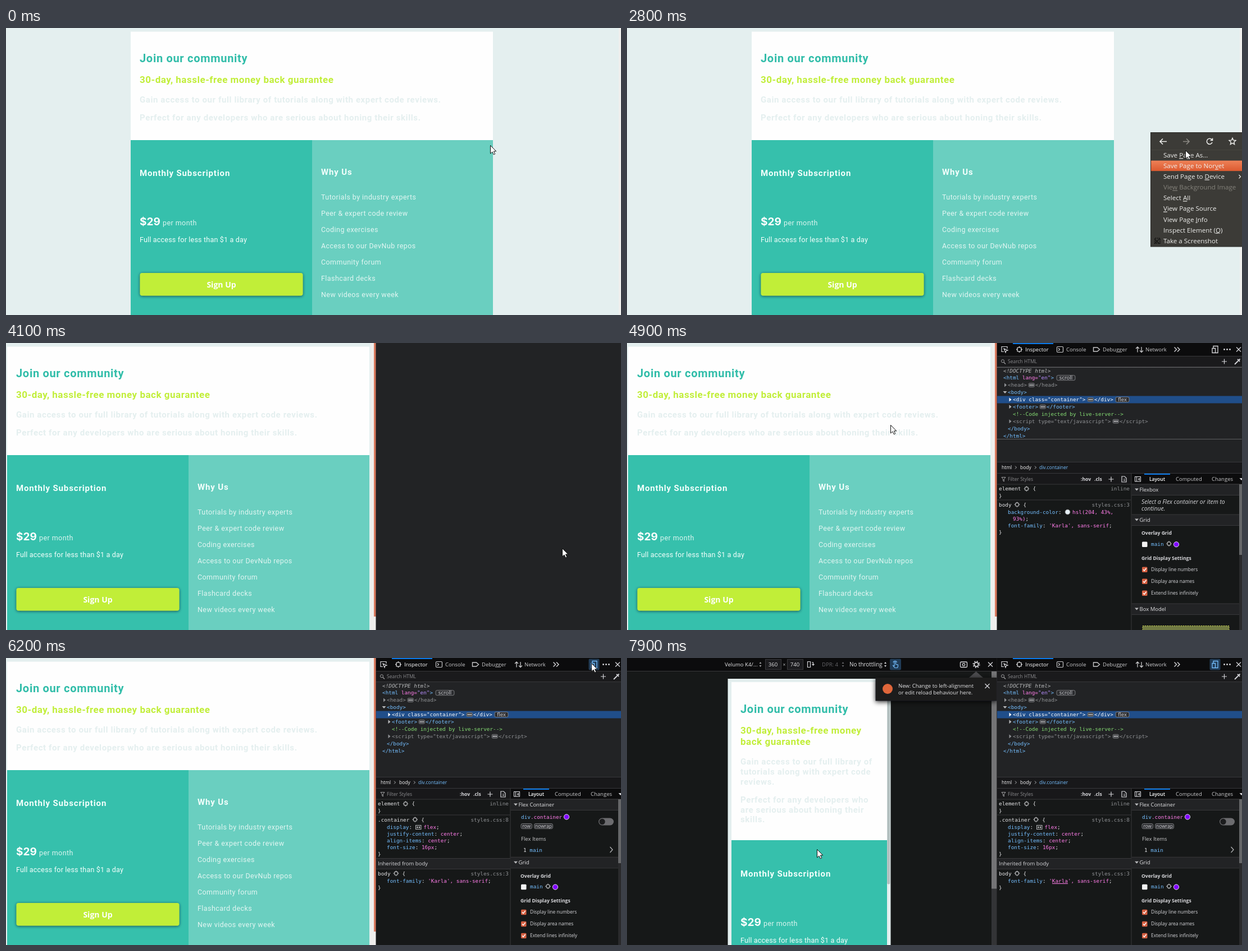
Write an HTML page that moves like this. It is 1095 px wide and 512 px high and loops after 8 s.

```html
<!DOCTYPE html>
<html lang="en">
<head>
<meta charset="utf-8">
<title>Responsive pricing page</title>
<style>
html, body { margin: 0; width: 100%; height: 100%; overflow: hidden; background: #e4efef; }
svg { display: block; width: 100%; height: 100%; }
text { white-space: pre; }
.h1, .h2, .h3, .h4, .li, .sm { font-family: Roboto, sans-serif; }
.h1 { font-size: 20px; font-weight: 700; letter-spacing: .7px; }
.h2 { font-size: 17px; font-weight: 700; letter-spacing: .51px; }
.h3 { font-size: 15px; font-weight: 700; letter-spacing: .6px; }
.h4 { font-size: 15px; font-weight: 700; letter-spacing: .85px; }
.li { font-size: 12.5px; letter-spacing: .43px; }
.sm { font-size: 12.5px; letter-spacing: .2px; }
.price { font-family: Inter, sans-serif; font-size: 19px; font-weight: 700; }
.u, .us, .ub, .ui, .btn, .menu { font-family: "Open Sans", sans-serif; }
.u { font-size: 9.5px; }
.us { font-size: 8.5px; }
.ub { font-size: 8.6px; font-weight: 700; }
.ui { font-size: 10.4px; font-style: italic; }
.btn { font-size: 14px; font-weight: 700; }
.menu { font-size: 11.6px; }
.m { font-family: "DejaVu Sans Mono", monospace; font-size: 9.35px; }
</style>
</head>
<body>
<svg id="stage" viewBox="0 0 1095 512" preserveAspectRatio="none"></svg>
<script>
const BG = '#e4efef', TEAL = '#36c0ac', LIME = '#c1ee39', BAR = '#0c0c0d', PANEL = '#222325', DARK = '#161818',
  LINE = '#38383b', GREY = '#b8b9bb', WHITE = '#f6f6f7', BLUE = '#75bfff', PURPLE = '#8000ff', ACTIVE = '#213c57';

const rect = (x, y, w, h, fill, more = '') => `<rect x="${x}" y="${y}" width="${w}" height="${h}" fill="${fill}" ${more}/>`;
const text = (cls, x, y, s, fill, more = '') => `<text class="${cls}" x="${x}" y="${y}" fill="${fill}" ${more}>${s}</text>`;
const path = (d, stroke = GREY, w = 1.2, fill = 'none') => `<path d="${d}" stroke="${stroke}" stroke-width="${w}" fill="${fill}"/>`;
const dot = (x, y, r, fill, more = '') => `<circle cx="${x}" cy="${y}" r="${r}" fill="${fill}" ${more}/>`;
const group = (id, s) => `<g id="${id}">${s}</g>`;
const hline = (x, y, w) => rect(x, y, w, 1, LINE);
const END = 'text-anchor="end"', MID = 'text-anchor="middle"';

// Each part of a code line starts with its colour letter.
const INK = { b: BLUE, p: '#ff7de9', v: '#b98eff', w: '#e4e4e6', d: '#8f9194', g: '#86de74', W: '#ffffff' };
const code = (x, y, ...parts) => text('m', x, y, parts.map(p =>
  `<tspan fill="${INK[p[0]]}">${p.slice(1).replace(/</g, '&lt;')}</tspan>`).join(''), WHITE);
const tag = (x, y, w, s, cls = 'u') => rect(x, y - 4.5, w, 9, '#2c2d30', 'rx="2.5" stroke="#8f9092" stroke-width=".8"') +
  text(cls, x + w / 2, y + 3, s, '#d7d7db', MID);
const dots = (x, y) => rect(x, y - 3.5, 10.5, 7, '#4a4b4f', 'rx="2" stroke="#8f9092" stroke-width=".6"') +
  [2.7, 5.3, 7.9].map(d => dot(x + d, y, .9, '#fff')).join('');
const right = (x, y, c = GREY) => path(`M${x} ${y - 3.5}v7l4-3.5z`, 'none', 0, c);
const down = (x, y, c = GREY) => path(`M${x} ${y - 2}h7l-3.5 4z`, 'none', 0, c);
const cross = (x, y, r = 4, c = '#d7d7db') => path(`M${x - r} ${y - r}l${2 * r} ${2 * r}m0 ${-2 * r}l${-2 * r} ${2 * r}`, c, 1.3);
const plus = (x, y) => path(`M${x - 4.5} ${y}h9m-4.5 -4.5v9`, '#d7d7db', 1.2);
const target = (x, y, r = 2.8, c = GREY) => rect(x - r, y - r, 2 * r, 2 * r, 'none', `rx="1" stroke="${c}" stroke-width="1.2"`) +
  path(`M${x} ${y - r - 2}v2m0 ${2 * r}v2M${x - r - 2} ${y}h2m${2 * r} 0h2`, c, 1.2);
const gear = (x, y) => dot(x, y, 3.6, 'none', 'stroke="#d7d7db" stroke-width="1.8"') +
  dot(x, y, 5.6, 'none', 'stroke="#d7d7db" stroke-width="1.8" stroke-dasharray="2 2.4"');
const updown = (x, y, c) => path(`M${x - 2} ${y - 1.5}l2 -3 2 3zM${x - 2} ${y + 1.5}l2 3 2 -3z`, 'none', 0, c);

function page() {
  const items = ['Tutorials by industry experts', 'Peer &amp; expert code review', 'Coding exercises',
    'Access to our DevNub repos', 'Community forum', 'Flashcard decks', 'New videos every week'];
  return rect(222, 6.5, 645, 194, '#fefefe') + rect(222, 200, 323, 312, TEAL) + rect(545, 200, 322, 312, '#6acfc0') +
    text('h1', 238, 61, 'Join our community', '#31bda9') +
    text('h2', 238, 98, '30-day, hassle-free money back guarantee', LIME) +
    text('h3', 238, 132.5, 'Gain access to our full library of tutorials along with expert code reviews.', BG) +
    text('h3', 238, 164.5, 'Perfect for any developers who are serious about honing their skills.', BG) +
    text('h4', 238, 264, 'Monthly Subscription', '#f4fffc') + price(238, 352) +
    rect(238.5, 437, 290, 40.5, LIME, 'rx="4" filter="url(#glow)"') +
    text('btn', 383.5, 462.5, 'Sign Up', '#fff', MID) +
    text('h4', 561, 262, 'Why Us', '#f4fffc') +
    items.map((s, i) => text('li', 561, 305.5 + i * 29.08, s, '#e2f6f2')).join('');
}

function price(x, y) {
  return text('price', x, y, '$29', '#fff') + text('li', x + 41, y, 'per month', '#dcf5f0') +
    text('sm', x, y + 30, 'Full access for less than $1 a day', '#f4fffc');
}

function menu() {
  const rows = ['Save _Page As…', 'Save Page to Nor_vet', 'Send Page to _Device', 'Vie_w Background Image', 'Select _All',
    '_View Page Source', 'View Page _Info', 'Inspect Element (_Q)', 'Take a Screenshot'];
  const star = Array.from({ length: 10 }, (_, i) => {
    const a = i * Math.PI / 5 - Math.PI / 2, r = i % 2 ? 2.8 : 6.2;
    return (1078 + r * Math.cos(a)).toFixed(1) + ' ' + (202.5 + r * Math.sin(a)).toFixed(1);
  });
  return rect(932.5, 186.5, 164, 203.5, '#3c3b37', 'stroke="#2b2a27"') + rect(933, 217, 162, 1, '#45443f') +
    rect(933, 236.5, 162, 18.6, 'url(#hot)', 'id="hot-row"') +
    path('M961 202.5h-12m5 -5l-5 5 5 5', '#eeeeec', 1.7) + path('M990 202.5h11m-5 -5l5 5 -5 5', '#8b8983', 1.7) +
    path('M1041.5 199.5a5 5 0 1 0 .5 4.5M1042.5 196.5v4h-4', '#eeeeec', 1.6) +
    path('M' + star.join('L') + 'z', '#eeeeec', 1.4) +
    rows.map((s, i) => text('menu', 955, 231.2 + i * 19.05, s.replace(/_(.)/, '<tspan text-decoration="underline">$1</tspan>'),
      i === 3 ? '#84827b' : '#eeeeec')).join('') +
    path('M1089.5 262l3 3.2 -3 3.2', '#eeeeec', 1.2) +
    rect(940, 375, 9, 9, 'none', 'stroke="#151513" stroke-width="1.6" stroke-dasharray="2 1.3"') +
    path('M939 385l9 -9M939 376l9 9', '#151513', 1.3);
}

function toolbar() {
  const tab = (x, s, c = '#c8c8ca') => text('u', x, 15, s, c);
  return rect(659, 0, 436, 23, BAR) + hline(659, 23, 436) + rect(687, 0, 72, 1.8, '#0a84ff') +
    path('M677 10V6.5h-10v9h4M671 10l7 3 -3 1 -1 3z', '#d7d7db', 1.2) +
    target(698.5, 11.5, 3.5, WHITE) + text('u', 709, 15, 'Inspector', '#fff', 'font-weight="500"') +
    rect(765.5, 6.5, 11, 10, 'none', 'rx="1.5" stroke="#c8c8ca" stroke-width="1.2"') + path('M768 9l2.5 2.5 -2.5 2.5', '#c8c8ca') +
    tab(782, 'Console') + path('M830.5 8h7l4 3.5 -4 3.5h-7z', '#c8c8ca', 1.4) + tab(847, 'Debugger') +
    path('M909 16.5V7m-3 3l3 -3 3 3M916 7v9.5m-3 -3l3 3 3 -3', '#c8c8ca', 1.3) + tab(923, 'Network') +
    path('M974.5 7.5l4 4 -4 4M980 7.5l4 4 -4 4', '#d7d7db', 1.4) +
    group('rdm-off', device('#d7d7db')) + group('rdm-on', rect(1037.5, 1.5, 19, 20, ACTIVE, 'rx="2"') + device(BLUE)) +
    [1063.5, 1068.5, 1073.5].map(x => dot(x, 11.5, 1.4, '#d7d7db')).join('') + cross(1089, 11.5);
}

const device = c => path('M1044 9V5.5h8v12h-4M1042 9.5h5.5v8H1042z', c, 1.3);

function tree() {
  const y = i => 52.5 + i * 12.93, c = i => y(i) - 3.3;
  return rect(659, 24, 436, 18.5, '#1a1a1c') + hline(659, 42, 436) +
    dot(669, 32.3, 2.6, 'none', 'stroke="#a0a0a2"') + path('M671 34.5l3 3', '#a0a0a2') +
    text('us', 678, 36, 'Search HTML', '#8b8b8e') + plus(1063.5, 33) +
    path('M1082 38l6 -6m-1 -3l4 4m-2 -2l2.5 -2.5', '#d7d7db', 1.8) +
    group('hover', rect(659, 69, 436, 12.7, '#333c46')) + rect(659, 94.5, 436, 13, '#204e8a') +
    text('m', 670, y(0), '&lt;!DOCTYPE html>', GREY, 'font-style="italic"') +
    code(670, y(1), 'b<html ', 'plang=', 'v"en"', 'b>') + tag(765, c(1), 33, 'scroll') +
    right(672, c(2), '#8f9194') + code(678, y(2), 'd<head>') + dots(715, c(2)) + code(727, y(2), 'd</head>') +
    down(669.5, c(3)) + code(678, y(3), 'b<body>') +
    right(680.5, c(4), '#fff') + code(687, y(4), 'W<div class="container">') + dots(820, c(4)) +
    code(832, y(4), 'W</div>') + tag(870, c(4), 24, 'flex') +
    right(680.5, c(5)) + code(687, y(5), 'b<footer>') + dots(735, c(5)) + code(747, y(5), 'b</footer>') +
    code(687, y(6), 'g\x3c!--Code injected by live-server-->') +
    right(680.5, c(7), '#8f9194') + code(687, y(7), 'd\x3cscript type="text/javascript">') + dots(865, c(7)) +
    code(877, y(7), 'd\x3c/script>') +
    code(678, y(8), 'b</body>') + code(670, y(9), 'b</html>') +
    group('focus', path('M659 43.5h436M659 171.5h436', '#9a9a9c', 1).replace('/>', ' stroke-dasharray="1 1"/>')) +
    rect(659, 212, 436, 20, '#18181a') + hline(659, 212, 436) + hline(659, 232, 436) +
    text('us', 667, 225, 'html', WHITE) + text('us', 700, 225, 'body', WHITE) + text('us', 734, 225, 'div.container', BLUE) +
    path('M691 219.5l2.5 2.5 -2.5 2.5M726 219.5l2.5 2.5 -2.5 2.5', GREY, 1);
}

function styleFrame() {
  return rect(659, 233, 239, 279, DARK) + rect(659, 233, 239, 18.5, '#18181a') + hline(659, 251.5, 239) +
    path('M667 239.5h7l-2.7 3.5v4l-1.6 -1v-3z', '#a0a0a2', 1) + text('us', 678, 246, 'Filter Styles', '#8b8b8e') +
    text('ub', 808, 246, ':hov', '#d7d7db') + text('ub', 832, 246, '.cls', '#d7d7db') + plus(862, 243) +
    path('M881 238h5l3 3v7h-8zM884 243h3m-3 2.5h3', '#d7d7db', 1.2) +
    rect(898, 233, 197, 279, DARK) + rect(898, 233, 197, 18.5, BAR) + hline(898, 251.5, 197) + rect(897.5, 233, 1, 279, LINE) +
    rect(904.5, 238.5, 10, 8.5, 'none', 'stroke="#d7d7db" stroke-width="1.1"') + path('M907.5 238.5v8.5M912.5 241l-2.5 2 2.5 2z', '#d7d7db', 1) +
    rect(921, 233, 46, 1.8, '#0a84ff') + text('us', 930, 246, 'Layout', '#fff', 'font-weight="600"') +
    text('u', 977, 246, 'Computed', '#c8c8ca') + text('u', 1041, 246, 'Changes', '#c8c8ca') + down(1090.5, 243, '#d7d7db');
}

const rule = (y, name, link) => code(662, y, 'w' + name) + target(662 + name.length * 5.63 + 10, y - 3.3) +
  code(662 + name.length * 5.63 + 21, y, 'w{') + text('m', 895, y, link, '#8f9194', END);
const prop = (y, name, value) => code(678, y, 'b' + name, 'w: ', 'p' + value, 'w;');
const split = y => hline(659, y, 239);
const karla = y => prop(y, 'font-family', "'Karla', sans-serif") + group('link', path(`M757 ${y + 1.5}h28`, '#ff7de9', 1));

function rulesBody() {
  return rule(263.3, 'element', 'inline') + code(662, 275.5, 'w}') + split(279.5) +
    rule(291.5, 'body', 'styles.css:3') + code(678, 304.5, 'bbackground-color', 'w:') +
    dot(784.5, 301.5, 4.3, '#e5eff5', 'stroke="#999"') + code(793, 304.5, 'phsl(204, 43%,') + code(687, 317, 'p93%)', 'w;') +
    prop(329.3, 'font-family', "'Karla', sans-serif") + code(662, 341, 'w}');
}

function rulesContainer() {
  return rule(263.3, 'element', 'inline') + code(662, 275.5, 'w}') + split(279.5) +
    rule(291.5, '.container', 'styles.css:8') + code(678, 304.8, 'bdisplay', 'w:') +
    rect(729.5, 298.5, 9.5, 7, 'none', 'stroke="#b8b9bb"') + rect(731.3, 300.5, 2.3, 3, GREY) + rect(735, 300.5, 2.3, 3, GREY) +
    code(743.5, 304.8, 'pflex', 'w;') + prop(317, 'justify-content', 'center') + prop(329.3, 'align-items', 'center') +
    prop(341.3, 'font-size', '16px') + code(662, 353, 'w}') +
    rect(659, 357.5, 238.5, 18.5, PANEL) + split(357) + split(376) + text('u', 662, 370, 'Inherited from body', '#d7d7db') +
    rule(387.5, 'body', 'styles.css:3') + karla(401) + code(662, 412.5, 'w}');
}

const head = (y, s) => rect(898.5, y - 9.5, 192, 19, PANEL) + hline(898.5, y - 10, 192) + hline(898.5, y + 9.5, 192) +
  down(904, y) + text('u', 912.5, y + 3.4, s, '#e4e4e6');

function grid() {
  const check = (y, s) => rect(917, y - 4.5, 9.5, 9.5, '#d65f41', 'rx="1.5"') + path(`M919 ${y}l2 2.3 3.6 -4.6`, '#fff', 1.4) +
    text('us', 933, y + 3.2, s, '#d7d7db');
  return head(315.5, 'Grid') + text('ub', 916, 342.3, 'Overlay Grid', '#d7d7db') + rect(917, 354.5, 9.5, 9.5, '#f2f2f2', 'rx="1.5"') +
    code(933, 362, 'bmain') + target(965, 358) + dot(978, 359.3, 4.6, PURPLE, 'stroke="#e8dcff"') +
    text('ub', 916, 387, 'Grid Display Settings', '#d7d7db') +
    check(404, 'Display line numbers') + check(425, 'Display area names') + check(446, 'Extend lines infinitely') +
    head(474.5, 'Box Model') + rect(918, 504.5, 154, 20, '#717a43', 'stroke="#c8d04e" stroke-dasharray="2 2"');
}

const flexEmpty = () => head(261.5, 'Flexbox') + text('ui', 916, 286.5, 'Select a Flex container or item to', '#d7d7db') +
  text('ui', 916, 298.5, 'continue.', '#d7d7db');

const flexInfo = () => head(261.5, 'Flex Container') + code(917, 287.3, 'bdiv', 'p.container') +
  dot(998, 283.5, 4.6, PURPLE, 'stroke="#e8dcff"') + tag(917, 300, 19.5, 'row', 'us') + tag(940.5, 300, 33, 'nowrap', 'us') +
  rect(1055, 285.5, 27, 13, '#6c6c6f', 'rx="6.5"') + dot(1061.5, 292, 5.2, '#1b1c1d') +
  text('u', 917, 325.5, 'Flex Items', '#c8c8ca') + code(921, 345.5, 'w1', 'b main') + path('M1075.5 337l4.5 5 -4.5 5', GREY, 1.2);

function phone() {
  const lines = (cls, y, step, fill, ...rows) => rows.map((s, i) => text(cls, 202, y + i * step, s, fill)).join('');
  return rect(179.5, 37, 290, 475, BG) + rect(186, 43, 277, 283, '#fefefe') + rect(186, 325, 277, 187, TEAL) +
    rect(463.3, 39, 5, 364.5, '#b3bfbf', 'rx="2"') +
    text('h1', 202, 98, 'Join our community', '#31bda9') +
    lines('h2', 135, 20, LIME, '30-day, hassle-free money', 'back guarantee') +
    lines('h3', 190, 17.8, BG, 'Gain access to our full library of', 'tutorials along with expert code', 'reviews.') +
    lines('h3', 257.8, 17.8, BG, 'Perfect for any developers who', 'are serious about honing their', 'skills.') +
    text('h4', 202, 390, 'Monthly Subscription', '#f4fffc') + price(202, 478);
}

function deviceBar() {
  const box = (x, w, s) => rect(x + .5, 2.5, w, 18, '#1c1c1f', 'stroke="#3a3a3d"') + text('u', x + w / 2, 15, s, '#e4e4e6', MID);
  return rect(0, 0, 659, 23, BAR) + hline(0, 23, 659) +
    group('dev-none', text('u', 178, 15, 'Responsive', '#77777a')) + group('dev-set', text('u', 174, 15, 'Velumo K4/...', '#e4e4e6')) +
    updown(237.5, 11.5, '#a0a0a2') + box(246, 28, '360') + text('us', 280, 15, '×', GREY, MID) + box(285, 28, '740') +
    path('M321.5 6.5h5v10h-5zM329 8h2.5v5m-2 -2l2 2 2 -2', '#d7d7db', 1.2) +
    text('u', 347, 15, 'DPR: 4', '#66666a') + updown(384.5, 11.5, '#66666a') + text('u', 396, 15, 'No throttling', '#e4e4e6', 'style="font-size:9.9px"') +
    updown(460, 11.5, '#d7d7db') + rect(468, 1.5, 20, 20, ACTIVE, 'rx="2"') +
    path('M476 14V7.5q1.2 -1.5 2.4 0V11l4 1v3.5l-1.2 2h-4.5l-3 -4zM474 8a3.3 3.3 0 0 1 6.5 0', BLUE, 1.1) +
    rect(593.5, 7, 12, 9.5, 'none', 'rx="1.5" stroke="#d7d7db" stroke-width="1.3"') + dot(599.5, 11.8, 2.2, 'none', 'stroke="#d7d7db" stroke-width="1.2"') +
    gear(622, 11.5) + cross(647, 11.5);
}

const notice = () => path('M609 35l12.5 -11 12.5 11z', 'none', 0, '#4a4a4d') + rect(442.5, 35, 216, 41.5, '#1c1d1f', 'filter="url(#drop)"') +
  dot(464, 55, 9, '#e0663a') + text('u', 483, 53, 'New: Change to left-alignment', '#e4e4e6') +
  text('u', 483, 65, 'or edit reload behaviour here.', '#e4e4e6') + cross(641.5, 50);

const stage = document.getElementById('stage');
stage.innerHTML = `<defs>
  <filter id="glow" x="-5%" y="-30%" width="110%" height="160%"><feDropShadow dx="0" dy="1" stdDeviation="2.5" flood-color="#123" flood-opacity=".75"/></filter>
  <filter id="drop" x="-10%" y="-30%" width="120%" height="170%"><feDropShadow dx="0" dy="2" stdDeviation="4" flood-opacity=".8"/></filter>
  <linearGradient id="hot" x2="0" y2="1"><stop stop-color="#ee8157"/><stop offset="1" stop-color="#dc5a30"/></linearGradient></defs>` +
  rect(0, 0, 1095, 512, BG) + group('page', page()) + group('edge', rect(1091, 0, 4, 512, '#efefed')) + group('menu', menu()) +
  group('bar', rect(649, 0, 10, 512, '#efeeec') + rect(655, 0, 4, 488, '#d9795e')) +
  group('rdm', rect(0, 0, 659, 512, DARK) + group('phone', phone()) + rect(649, 24, 9.5, 488, '#333436') +
    rect(649, 24, 9.5, 387.5, '#747476') + deviceBar() + group('notice', notice())) +
  group('tools', rect(658.5, 0, 437, 512, PANEL) + group('toolbar', toolbar()) + group('tree', tree()) +
    group('frame', styleFrame()) + group('old', rulesBody() + flexEmpty()) + group('new', rulesContainer() + flexInfo()) +
    group('grid', grid()) + group('thumb', rect(1090, 252, 5, 260, '#2a2a2c') + rect(1090, 252, 5, 114, '#666769') + rect(1090, 366, 5, 12, '#666769', 'id="tail"'))) +
  group('cursor', path('M0 0V14.5L3.4 11.4 5.8 16.4 8.2 15.3 5.9 10.4H10.3Z', '#111', 1, '#fff'));

const el = id => document.getElementById(id);
const show = (id, on) => el(id).setAttribute('display', on ? 'inline' : 'none');
const move = (id, x, y) => el(id).setAttribute('transform', `translate(${x} ${y})`);

// Pointer: time, x, y
const KEYS = [[400, 862, 209], [900, 967, 188], [1300, 967, 188], [1400, 969, 182], [1500, 969, 182], [1700, 990, 184],
  [2000, 720, 199], [2200, 932, 187], [2700, 932, 187], [2800, 994, 218], [3200, 990, 380], [3300, 990, 380], [3400, 988, 374],
  [3500, 988, 374], [3600, 990, 366], [4200, 990, 366], [4900, 469, 146], [5200, 735, 62], [5500, 930, 30], [5800, 1030, 14],
  [5900, 1030, 14], [6200, 1042, 9], [6300, 1042, 9], [6500, 1027, 18], [6700, 1022, 24], [7000, 355, 152], [7200, 355, 152],
  [7400, 290, 76], [7600, 215, 170], [7900, 338, 341]];

function pointer(t) {
  const i = KEYS.findIndex(k => k[0] >= t);
  if (i <= 0) return KEYS[0].slice(1);
  const [a, b] = [KEYS[i - 1], KEYS[i]], u = (t - a[0]) / (b[0] - a[0]);
  return [a[1] + (b[1] - a[1]) * u, a[2] + (b[2] - a[2]) * u];
}

function render(ms) {
  const t = Math.floor(ms / 100) * 100;
  const [x, y] = pointer(t), open = t >= 4100, rdm = t >= 6400, named = t >= 6800;
  move('cursor', x + .5, y + .5);
  move('page', open ? -220 : 0, 0);
  show('edge', !open);
  show('menu', t >= 2400 && !open);
  show('hot-row', t >= 2800 && !open);
  const row = t === 2800 ? 1 : Math.min(8, Math.max(0, Math.floor((y - 217.5) / 19.05)));
  el('hot-row').setAttribute('y', 217.5 + row * 19.05);
  show('bar', open);
  show('tools', open);
  show('toolbar', t >= 4300);
  show('tree', t >= 4500);
  const ready = t >= 4700, fresh = t >= 5000;
  for (const id of ['frame', 'grid', 'thumb']) show(id, ready);
  show('old', ready && !fresh);
  show('new', fresh);
  show('tail', !fresh);
  move('grid', 0, fresh ? 49.3 : 0);
  show('hover', t === 5200);
  show('focus', t < 6200);
  show('rdm-off', t < 6200);
  show('rdm-on', t >= 6200);
  show('rdm', rdm);
  show('phone', t >= 6500);
  show('link', rdm);
  show('dev-none', !named);
  show('dev-set', named);
  show('notice', named);
}

const start = performance.now();
function tick(now) {
  render(Math.max(0, now - start) % 8000);
  requestAnimationFrame(tick);
}
render(0);
requestAnimationFrame(tick);
</script>
</body>
</html>
```
